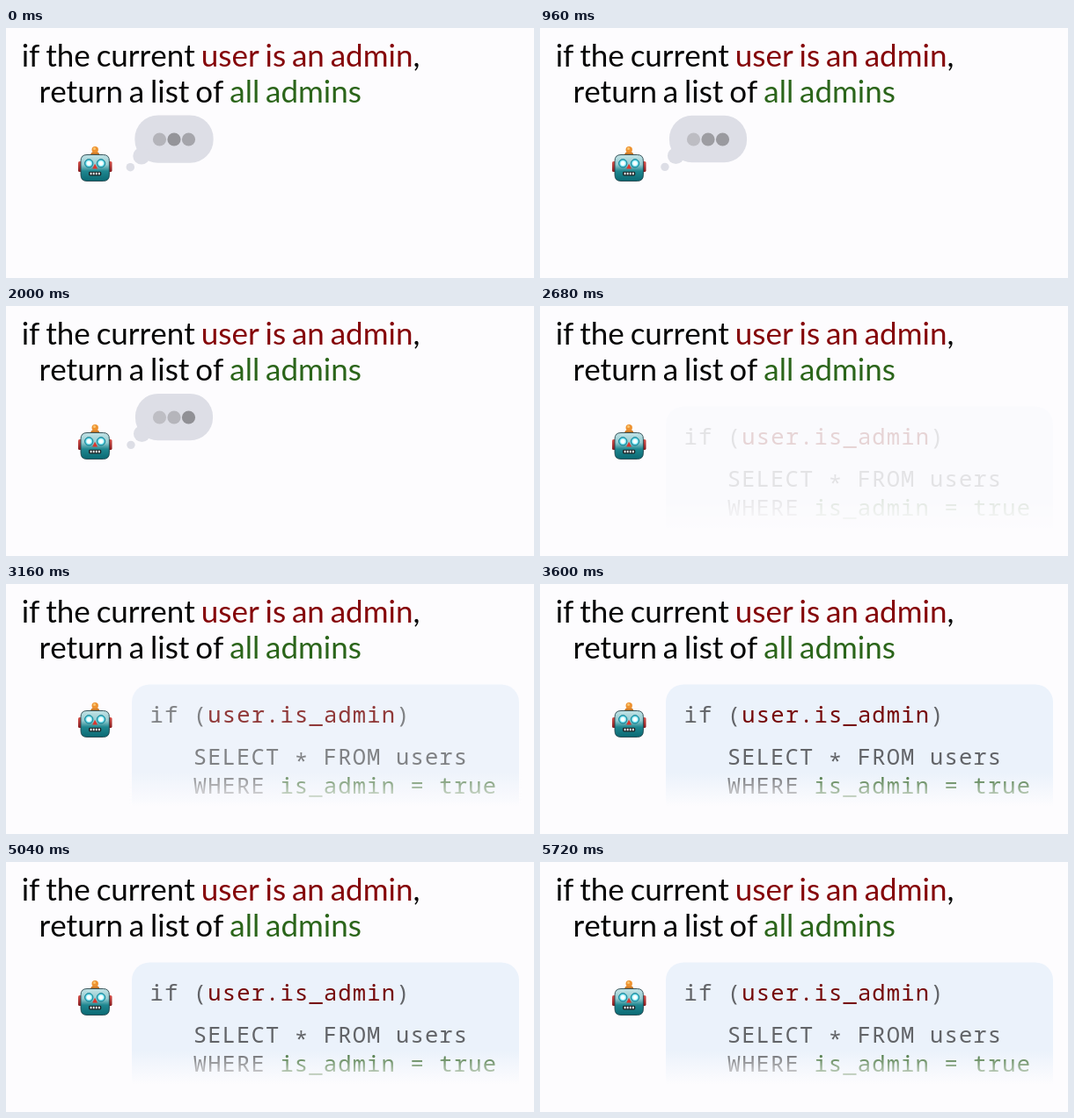
Write an HTML page that moves like this. It is 600x285 px and loops after 5760 ms.

```html
<!DOCTYPE html>
<html lang="en">
<head>
<meta charset="utf-8">
<title>Prompt to query</title>
<style>
  html, body { margin: 0; width: 100%; height: 100%; overflow: hidden; background: #fdfcfe; }
  svg { display: block; width: 600px; height: 285px; }
  text { white-space: pre; }
  .prompt { font: 35px Lato, sans-serif; font-kerning: none; word-spacing: -2.1px; fill: #060606; }
  .code { font: 25.5px "Noto Sans Mono", "DejaVu Sans Mono", monospace; letter-spacing: 1.15px; fill: #626468; }
  .prompt .cond { fill: #850408; }
  .prompt .result { fill: #2b651a; }
  .code .cond { fill: #760909; }
  .code .result { fill: #3a6b31; }
</style>
</head>
<body>
<svg viewBox="0 0 600 285">
  <defs>
    <linearGradient id="metal" x1="0" y1="0" x2="0" y2="1">
      <stop offset="0" stop-color="#c3e3e6"/>
      <stop offset=".38" stop-color="#93cbd0"/>
      <stop offset=".62" stop-color="#1f8790"/>
      <stop offset="1" stop-color="#0a6872"/>
    </linearGradient>
    <linearGradient id="ear" x1="0" y1="0" x2="0" y2="1">
      <stop offset="0" stop-color="#d9534c"/>
      <stop offset="1" stop-color="#861a1e"/>
    </linearGradient>
    <radialGradient id="eye">
      <stop offset="0" stop-color="#ffffff"/>
      <stop offset=".45" stop-color="#f0feff"/>
      <stop offset=".75" stop-color="#6adcea"/>
      <stop offset="1" stop-color="#1a9ab2"/>
    </radialGradient>
    <linearGradient id="fade" x1="0" y1="0" x2="0" y2="1">
      <stop offset="0" stop-color="#fdfcfe" stop-opacity="0"/>
      <stop offset=".6" stop-color="#fdfcfe"/>
      <stop offset="1" stop-color="#fdfcfe"/>
    </linearGradient>
  </defs>

  <rect width="600" height="285" fill="#fdfcfe"/>

  <text class="prompt" x="17.7" y="43.5">if the current <tspan class="cond">user is an admin</tspan>,</text>
  <text class="prompt" x="37.4" y="85">return a list of <tspan class="result">all admins</tspan></text>

  <g id="robot">
    <rect x="82" y="152" width="4.5" height="12" rx="1.6" fill="url(#ear)"/>
    <rect x="116" y="152" width="4.5" height="12" rx="1.6" fill="url(#ear)"/>
    <path d="M96 145q0-4 5.2-4t5.2 4z" fill="#c8792a"/>
    <circle cx="101.200" cy="138.800" r="3.700" fill="#ee9230"/>
    <circle cx="100.500" cy="137.600" r="1.500" fill="#fbc771"/>
    <path d="M92 144.500h18.400q7 0 7 7v16q0 7-7 7h-18.400q-7 0-7-7v-16q0-7 7-7z" fill="url(#metal)" stroke="#23424a" stroke-width=".9"/>
    <g stroke="#157f92" stroke-width=".9" fill="url(#eye)">
      <circle cx="94.200" cy="154.300" r="4.700"/>
      <circle cx="108" cy="154.300" r="4.700"/>
    </g>
    <path d="M101.100 154.800l3 5.700h-6z" fill="#dc352c"/>
    <rect x="94" y="163.700" width="14.200" height="4.800" rx="1.400" fill="#1b2427"/>
    <path d="M95.600 166.100h11.300" stroke="#eef3f3" stroke-width="2.500" stroke-dasharray="1.900 1.200"/>
  </g>

  <g id="typing">
    <g id="balloon" fill="#dddee6">
      <rect x="146.800" y="99.800" width="88.400" height="53.600" rx="26"/>
      <circle cx="154.300" cy="145.700" r="9.500"/>
      <circle cx="141.800" cy="158.400" r="4.700"/>
    </g>
    <g id="dots">
      <circle cx="174.500" cy="127" r="7.600"/>
      <circle cx="191" cy="127" r="7.600"/>
      <circle cx="207.500" cy="127" r="7.600"/>
    </g>
  </g>

  <g id="answer">
    <rect x="143" y="114.500" width="440" height="160" rx="20" fill="#ebf2fb"/>
    <text class="code" x="163.500" y="158">if (<tspan class="cond">user.is_admin</tspan>)</text>
    <text class="code" x="212.700" y="206">SELECT <tspan dy="5">*</tspan><tspan dy="-5"> FROM users</tspan></text>
    <text class="code" x="212.700" y="239">WHERE <tspan class="result">is_admin = true</tspan></text>
    <rect x="140" y="215" width="446" height="64" fill="url(#fade)"/>
  </g>
</svg>
<script>
  const LOOP = 5760;
  const TYPING_END = 2560;
  const FADE_TIME = 750;
  const DOT_PERIOD = 890;
  const DOT_PEAKS = [0.06, 0.3, 0.62];
  const PULSE_PERIOD = 1480;
  const LIGHT = [193, 193, 199], DARK = [144, 144, 149];

  const byId = id => document.getElementById(id);
  const typing = byId("typing"), balloon = byId("balloon"), answer = byId("answer");
  const dots = [...byId("dots").children];
  const clamp = v => Math.min(1, Math.max(0, v));
  const wave = turns => 0.5 + 0.5 * Math.cos(turns * 2 * Math.PI);
  const mix = k => `rgb(${LIGHT.map((c, i) => Math.round(c + (DARK[i] - c) * k))})`;

  function draw(t) {
    const phase = 0.39 + t / DOT_PERIOD;
    dots.forEach((dot, i) => dot.setAttribute("fill", mix(wave(phase - DOT_PEAKS[i]))));

    const scale = 0.994 + 0.016 * wave(t / PULSE_PERIOD);
    balloon.setAttribute("transform", `translate(191 127) scale(${scale}) translate(-191 -127)`);

    typing.style.display = t < TYPING_END ? "" : "none";
    answer.style.opacity = clamp((t - TYPING_END) / FADE_TIME);
  }

  const start = performance.now();
  function tick() {
    draw((performance.now() - start) % LOOP);
    requestAnimationFrame(tick);
  }
  draw(0);
  requestAnimationFrame(tick);
</script>
</body>
</html>
```
